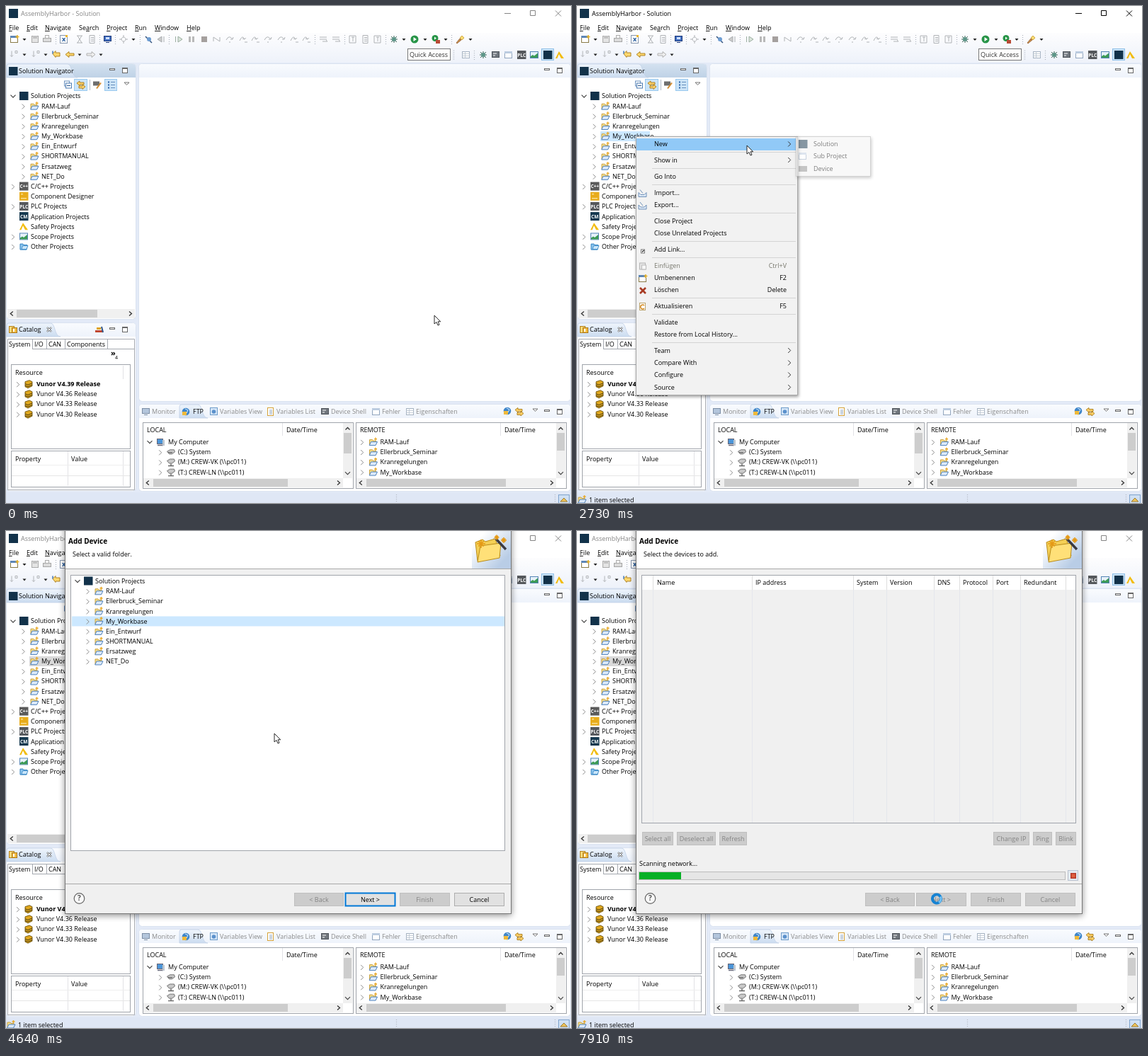
Write an HTML page that moves like this. It is 798x702 px and loops after 7990 ms.

```html
<!DOCTYPE html>
<html lang="en">
<head>
<meta charset="utf-8">
<title>Add device</title>
<style>
html, body { margin: 0; width: 100%; height: 100%; overflow: hidden; background: #fff; }
svg { display: block; }
text { font: 9px "Open Sans", "Noto Sans", sans-serif; white-space: pre; }
.b { font-weight: 700; }
.u { text-decoration: underline; }
.shadow { filter: drop-shadow(1px 2px 2px rgba(0,0,0,.4)); }
</style>
</head>
<body>
<svg id="stage" width="798" height="702" viewBox="0 0 798 702"></svg>
<script>
const LOOP = 7990;
const GREY = '#8a8a8a', EDGE = '#a0a4ab', YEL = '#eab428', NAVY = '#12324a';
const jobs = ['RAM-Lauf', 'Ellerbruck_Seminar', 'Kranregelungen', 'My_Workbase',
  'Ein_Entwurf', 'SHORTMANUAL', 'Ersatzweg', 'NET_Do'];

// Drawing helpers
const box = (x, y, w, h, fill, more = '') => `<rect x="${x}" y="${y}" width="${w}" height="${h}" fill="${fill}" ${more}/>`;
const frame = (x, y, w, h, fill, line, sw = 1) => box(x + .5, y + .5, w - 1, h - 1, fill, `stroke="${line}" stroke-width="${sw}"`);
const path = (d, line, fill = 'none', sw = 1, more = '') => `<path d="${d}" fill="${fill}" stroke="${line}" stroke-width="${sw}" ${more}/>`;
const text = (x, mid, s, fill = '#000', more = '') => `<text x="${x}" y="${mid + 3.4}" fill="${fill}" ${more}>${s}</text>`;
const group = (id, s) => `<g id="${id}">${s}</g>`;
const vline = (x, y, h, c = '#e2e2e6') => box(x, y, 1, h, c);
const right = (x, y, c = '#8c8c8c') => path(`M${x - 1.8} ${y - 3.5}l3.5 3.5l-3.5 3.5`, c);
const left = (x, y) => path(`M${x + 1.8} ${y - 3}l-3.5 3l3.5 3`, '#333', 'none', 1.3);
const down = (x, y) => path(`M${x - 3.5} ${y - 1.8}l3.5 3.5l3.5 -3.5`, '#444', 'none', 1.2);
const up = (x, y) => path(`M${x - 3} ${y + 1.5}l3 -3l3 3`, '#333', 'none', 1.3);
const drop = (x, y) => path(`M${x - 2.5} ${y - 1}h5l-2.5 3z`, 'none', '#222');
const viewMenu = (x, y) => path(`M${x} ${y}h7l-3.5 3.5z`, '#666', '#fff', .9);
const minMax = (x, y) => frame(x, y - 2, 8, 3, '#fff', '#666') +
  frame(x + 18, y - 3, 8, 8, '#fff', '#666') + box(x + 18, y - 3, 8, 2, '#666');
const badge = (s, fill) => box(0, 0, 12.5, 12, fill) +
  `<text x="6.2" y="8.6" fill="#fff" text-anchor="middle" style="font-size:6.5px;font-weight:700">${s}</text>`;

const dim = d => path(d, '#b0b3b6');
const arrow = (d, c, f) => path(d, c, f, .9);
const icons = {
  folder: path('M1 10V3h4l1 1.5h4V10z', '#c39a35', '#f7df8b', .9) +
    path('M.7 11L3 6h9L9.5 11z', '#3f77b8', '#dceafa', .9) + path('M9.5 0v4M7.5 2h4', '#e8a92a', 'none', 1.4),
  navy: box(0, 0, 12.5, 12, NAVY),
  cpp: badge('C++', '#5a5a5a'),
  plc: badge('PLC', '#55585c'),
  cm: badge('CM', '#14384f'),
  comp: box(0, 0, 12.5, 12, '#e8ac1b') + path('M2 3h3M2 9h8', '#fff3c8', 'none', 1.2),
  tri: path('M5 1L12 11H8L5 5L2.5 11H0z', 'none', '#f2bd10'),
  scope: frame(0, 1, 12, 10, '#e6f1fa', '#5585b5') + path('M1 10V8l3-2l2 1.5l5-4V10z', 'none', '#3b9a55'),
  other: path('M1 10.5V2.5h4l1 1.5h5l-1 6.5z', '#2c7fc0', '#8fc7ef') + path('M3 10l1.5-5H12l-2 5z', '#2c7fc0', '#c9e5f9', .8),
  book: path('M1 3l6-2l4 2v6l-6 3l-4-2z', '#6b5310', '#e0a81e', .9) + path('M1 6l4 1.5l6-2.5M1 8.5l4 1.5l6-2.5', '#4d3c10'),
  drive: path('M.5 5l4-2.5h6l1 3l-4 3h-4z', '#666', '#c9c9c9', .9) + path('M2 6.5h6', '#444'),
  net: path('M.5 4l4-2.5h6l1 3l-4 3h-4z', '#666', '#c9c9c9', .9) + path('M6 8v3M2 11h8', '#666', 'none', 1.4),
  pc: frame(1, 1, 9, 8, '#4b95d8', '#667') + path('M2 10.5h8', '#667', 'none', 1.5) + box(9, 3, 3, 8, '#bcc5cf'),
  screen: frame(0, 1, 11, 8, '#b4c6dc', '#7c8ea5') + path('M3 10.5h5', '#7c8ea5'),
  term: frame(0, 1, 11, 9, '#70767d', '#50565c') + path('M2 4h5M2 7h3', '#fff'),
  globe: `<circle cx="6" cy="6" r="5.3" fill="#3f86c9"/>` + box(1, 6, 6, 5, '#efb93a') + path('M5 2l4 2l-2 4', '#d9edff'),
  view: frame(0, 0, 11, 11, '#d7e7f8', '#6e9cc9') + `<circle cx="5.5" cy="6" r="2.8" fill="#5b91cc"/>`,
  list: frame(1, 0, 9, 12, '#fff', '#d6a23a') + path('M4 4h4M4 6.5h4M4 9h4', '#7e97b5'),
  win: frame(0, 1, 11, 10, '#fff', '#91a5be') + box(0, 1, 11, 3, '#bccce0'),
  table: frame(0, 1, 11, 10, '#fff', '#a6b3c2') + path('M0 4.5h11M0 7.5h11M4.5 1v10', '#b7c2cf', 'none', .8),
  fresh: frame(0, 1, 11, 10, '#fff', '#8a7b48') + box(0, 1, 11, 3, '#5d86b6') + path('M10 0v5M7.5 2.5h5', YEL, 'none', 1.6),
  save: frame(1, 1, 10, 10, '#e4e4e4', '#aaa') + box(3, 1, 6, 4, '#c2c2c2'),
  print: frame(0, 4, 12, 6, '#dcdcdc', '#a5a5a5') + frame(3, 0, 6, 5, '#fff', '#aaa'),
  x: frame(0, 0, 11, 12, '#fff', '#8797ae') + text(3, 5.5, 'x', '#1d5599', 'class="b"') + box(8, 0, 3, 3, YEL),
  mon: frame(0, 1, 11, 8, '#3f6dc0', '#203c7c') + box(3, 3, 5, 3, '#cfe0ff') + path('M3 10.5h5', '#203c7c'),
  doc: dim('M2 .5h7v11h-7zM4 3.5h4M4 6h4M4 8.5h4'),
  sand: dim('M2 1h8M2 11h8M3 1l3 5l-3 5M9 1l-3 5l3 5'),
  gear: dim('M6 3a3 3 0 1 0 .1 0M6 0v3M6 9v3M0 6h3M9 6h3'),
  skip: path('M1 2l9 9', '#33527e', 'none', 1.5) + `<circle cx="6" cy="6" r="3" fill="#6c9cd2"/>`,
  back: path('M7 2L1 6l6 4zM10 2v8', '#a9adb0', '#ccc'),
  play: path('M5 2l6 4l-6 4zM1.5 2v8', '#9aaea0', '#dbe5dc'),
  pause: box(2, 2, 3, 8, '#b9b9b9') + box(7, 2, 3, 8, '#b9b9b9'),
  stop: box(2, 2, 8, 8, '#a5a09e'),
  cut: dim('M1 9V3l9 6V3'),
  step: dim('M1 8Q5 -1 8 6l2-2M8 6L5 5M8 10h4'),
  over: dim('M1 7Q5 -1 10 6l1-3M10 6L7 6M5 10h2'),
  rows: dim('M0 3h10M0 6h10M4 9h7l-2-2'),
  para: dim('M1 1h9v10h-9zM6 3v6M4 3h4'),
  bug: path('M6 1v10M1 6h10M2 2l8 8M10 2l-8 8', '#3d6257') + `<circle cx="6" cy="6" r="3" fill="#5d9688"/>`,
  run: `<circle cx="6" cy="6" r="5.5" fill="#279447"/>` + path('M4.5 3l4.5 3l-4.5 3z', 'none', '#fff'),
  runx: `<circle cx="5" cy="4.5" r="4.5" fill="#279447"/>` + path('M4 2.5l3 2l-3 2z', 'none', '#fff') + box(6, 7, 6, 5, '#b84a35'),
  torch: path('M1 11l5-6l2 2l-6 5z', '#94623b', '#c98b45', .8) + path('M6 4l3-3l3 3l-3 3z', '#c79a28', '#f8dc76', .8),
  pin: dim('M3 1v8l-2-2M3 9l2-2M8 1h3v3h-3z'),
  ret: arrow('M1 5l4-4v2.5h6v5h-6V10z', '#a97a16', '#ffd970') + path('M1 1v4', '#3f77b8', 'none', 1.5),
  prev: arrow('M0 6l5-4v2.5h7v3h-7V10z', '#a97a16', '#ffd970'),
  next: arrow('M12 6L7 2v2.5H0v3h7V10z', '#aaa', '#eee'),
  fold: frame(0, 0, 8, 8, '#fff', '#6b92bf') + frame(2, 3, 9, 8, '#fff', '#4879b0') + path('M4 7h5', '#28558b'),
  link: arrow('M0 3.5l4-3v2h6v3H4v1.5zM12 8.5l-4-3v2H3v3h5v1.5z', '#a97a16', '#ffd26a'),
  filter: box(0, 1, 9, 6, '#6e6e6e') + path('M5 11l6-8', '#d28c2f', 'none', 2),
  tree: path('M1 2h2M1 6h2M1 10h2', '#2a61a8', 'none', 2) + path('M5 2h6M5 6h6M5 10h6', '#6b92bf', 'none', 1.2),
  shelf: box(0, 7, 11, 3, '#c2472f') + box(2, 3, 6, 3, '#e0a422') + path('M9 2l2 8', '#35588a', 'none', 2),
  cat: frame(0, 1, 8, 10, '#ffdc7a', '#b4801a') + frame(4, 3, 8, 8, '#f5bd41', '#a9771b') + box(6, 5, 2, 4, '#fff'),
  imp: path('M0 5v6h11V5l-3 3H3zM2 1l4 5', '#6287b3', '#dce8f5', .9),
  mini: frame(3, 5, 6, 6, '#fff', '#777') + path('M5 9l2.5-2.5', '#222', 'none', 1.3),
  paste: frame(1, 1, 9, 10, '#e5e5e5', '#b5b5b5') + frame(4, 4, 7, 7, '#f7f7f7', '#bbb'),
  del: path('M2 2l8 8M10 2l-8 8', '#a83a22', 'none', 2.6),
  redo: frame(1, 0, 9, 11, '#fff', '#bba36b') + path('M8 4a3 3 0 1 0 0 4', '#d48a20', 'none', 1.5),
  dev: box(0, 2, 12, 8, '#8d8d8d')
};
const icon = (key, x, mid) => `<g transform="translate(${x} ${mid - 6})">${icons[key]}</g>`;
const strip = (list, y) => list.split(' ').map(s => {
  const [key, x] = s.split(':');
  if (key === 'dd') return drop(+x, y);
  if (key === 'sep') return path(`M${x}.5 ${y - 6}v13`, '#aeb4bd', 'none', 1.2, 'stroke-dasharray="1 2"');
  return icon(key, +x, y);
}).join('');

const projectRows = (x, y, n = 8, pitch = 14.17) => jobs.slice(0, n).map((s, i) => {
  const m = y + i * pitch;
  return right(x - 25.5, m + .8) + icon('folder', x - 16, m) + text(x, m, s);
}).join('');
const hscroll = (x, y, w, a, b) => box(x, y, w, 13, '#f0f0f0') + box(a, y + 1, b - a, 11, '#cdcdcd') +
  left(x + 6, y + 6.5) + path(`M${x + w - 8} ${y + 3.5}l3.5 3l-3.5 3`, '#333', 'none', 1.3);
const vscroll = (x, end) => box(x, 589, 13, 78, '#f0f0f0') + box(x + 1, 603, 11, end - 603, '#cdcdcd') +
  up(x + 6.5, 597) + down(x + 6.5, 660);
const panel = (x, y, w, h, fill = 'idle') => `<rect x="${x + .5}" y="${y + .5}" width="${w - 1}" height="${h - 1}" rx="5" fill="#fff" stroke="#dbe3f0"/>` +
  path(`M${x + 1} ${y + 20}V${y + 5}q0 -4 4 -4H${x + w - 5}q4 0 4 4V${y + 20}z`, 'none', `url(#${fill})`);
const tab = (x, y, w) => path(`M${x} ${y + 20}V${y + 4}q0 -3 3 -3H${x + w - 12}c7 0 5 19 14 19z`, '#c0d0e6', 'url(#sel)', .8);

function drawWindow() {
  let s = box(0, 0, 798, 702, '#e3eaf7') + box(0, 0, 798, 38, '#fff') + box(0, 38, 798, 42, 'url(#bar)');
  s += box(4, 4, 13, 13, NAVY);
  s += group('caption', text(21, 10.5, 'AssemblyHarbor - Solution', 'currentColor') +
    path('M704 10.5h9M740.5 6.5h7v7h-7zM776 6.5l8 8M784 6.5l-8 8', 'currentColor'));
  s += [[4, 'File', 0], [29, 'Edit', 0], [55, 'Navigate', 0], [103, 'Search', 2], [142, 'Project', 0], [182, 'Run', 0],
    [210, 'Window', 0], [255, 'Help', 0]].map(([x, w, k]) =>
    text(x, 30.5, `${w.slice(0, k)}<tspan class="u">${w[k]}</tspan>${w.slice(k + 1)}`)).join('');
  s += strip('fresh:6 dd:26 save:35 print:52 sep:70 x:76 sand:98 doc:116 sep:132 mon:138 sep:154 gear:160 dd:180 sep:189 skip:196 back:213 sep:230 play:238 pause:256 stop:274 cut:292 over:310 step:329 step:346 over:364 over:383 step:401 step:418 sep:436 rows:443 rows:461 sep:478 para:484 doc:502 para:519 sep:536 bug:542 dd:562 run:571 dd:592 runx:601 dd:621 sep:629 torch:635 dd:656', 47);
  s += strip('pin:5 dd:26 pin:36 dd:56 ret:65 prev:84 dd:104 next:114 dd:134 sep:632', 68.5);
  s += frame(567, 60, 61, 17, '#fff', '#777') + text(570, 68.5, 'Quick Access', '#333');
  s += frame(756, 60, 18, 17, '#cce4f7', '#8fc0e8');
  s += strip('table:644 sep:661 bug:668 term:686 win:704 plc:722 scope:740 navy:759 tri:776', 69);

  // Navigator
  s += panel(0, 81, 184, 362, 'focus') + tab(1, 81, 98) + icon('navy', 4, 92) + text(18, 92, 'Solution Navigator') + minMax(146, 90);
  s += frame(96, 103, 19, 17, '#cce4f7', '#99c9ef') + frame(139, 103, 18, 17, '#cce4f7', '#99c9ef');
  s += strip('fold:82 link:100 filter:123 tree:143', 111.5) + vline(118, 104, 15, '#b5bcc6') + viewMenu(167, 108);
  const pick = (id, c) => group(id, box(33, 177, 70, 14, c));
  s += pick('hover', '#e5f3ff') + pick('picked', '#cce8ff') + pick('dimmed', '#d9d9d9');
  s += down(10, 127.5) + icon('navy', 19, 127) + text(35, 127, 'Solution Projects') + projectRows(50, 141.2);
  [['cpp', 'C/C++', 1], ['comp', 'Component Designer', 0], ['plc', 'PLC', 1], ['cm', 'Application', 0], ['tri', 'Safety', 0],
    ['scope', 'Scope', 1], ['other', 'Other', 1]].forEach(([key, w, open], i) => {
    const m = 254.6 + i * 14.17;
    s += (open ? right(10, m + .8) : '') + icon(key, 19, m) + text(35, m, key === 'comp' ? w : w + ' Projects');
  });
  s += hscroll(2, 428, 180, 15, 129);

  // Catalog
  s += panel(0, 447, 184, 239) + tab(1, 447, 74) + icon('cat', 4, 457) + text(18, 457, 'Catalog');
  s += path('M58 454l6 6M64 454l-6 6', '#666', 'none', 2.4) + path('M58 454l6 6M64 454l-6 6', '#fff', 'none', 1);
  s += icon('shelf', 126, 457) + minMax(146, 456) + path('M2.5 484V470.5H181.5V683.5H2.5V484M37.5 471v13M57.5 471v13M83.5 471v13M143.5 471v13M37 484.5H181', '#a5a9b0');
  s += text(4, 477.5, 'System') + text(40, 477.5, 'I/O') + text(60, 477.5, 'CAN') + text(86, 477.5, 'Components');
  s += text(148, 491, '»', '#000', 'class="b" style="font-size:11px"') + text(154, 495.5, '4', '#000', 'style="font-size:7px"');
  s += frame(7, 506, 169, 120, '#fff', EDGE) + text(13, 517.5, 'Resource') + vline(165, 508, 19);
  [39, 36, 33, 30].forEach((v, i) => {
    const m = 533.7 + i * 14.17;
    s += right(17, m + 1) + icon('book', 26, m) + text(43, m, `Vunor V4.${v} Release`, '#000', i ? '' : 'class="b"');
  });
  s += frame(7, 628, 169, 52, '#fff', EDGE) + text(13, 639.5, 'Property') + text(92, 639.5, 'Value');
  s += vline(87, 629, 49) + vline(165, 629, 49) + box(8, 648, 167, 1, '#eee') + box(8, 663, 167, 1, '#e6e6e6');

  // Editor and file transfer
  s += panel(187, 81, 611, 478) + minMax(760, 90) + panel(187, 562, 611, 124) + tab(245, 562, 38);
  [['screen', 192, 206, 'Monitor'], ['globe', 248, 264, 'FTP'], ['view', 288, 302, 'Variables View'], ['list', 368, 382, 'Variables List'],
    ['term', 445, 459, 'Device Shell'], ['win', 517, 531, 'Fehler'], ['table', 565, 579, 'Eigenschaften']].forEach(([k, x, tx, w]) => {
    s += icon(k, x, 573) + text(tx, 573, w, w === 'FTP' ? '#000' : GREY);
  });
  s += icon('globe', 702, 572) + icon('link', 719, 573) + viewMenu(744, 569) + minMax(760, 572);
  [[193, 'LOCAL', 632, 398], [494, 'REMOTE', 628, 706]].forEach(([x, w, end, b]) => {
    s += frame(x, 588, 298, 94, '#fff', EDGE) + text(x + 6, 599, w) + text(x + (x < 200 ? 203 : 210), 599, 'Date/Time') +
      vline(x + (x < 200 ? 197 : 204), 589, 18) + vscroll(x + 283, end) + hscroll(x + 1, 667, 282, x + 15, b);
  });
  s += down(203, 616) + icon('pc', 212, 616) + text(229, 615.5, 'My Computer');
  ['(C:) System', '(M:) CREW-VK (\\\\pc011)', '(T:) CREW-LN (\\\\pc011)'].forEach((w, i) => {
    const m = 629.8 + i * 14.17;
    s += right(218, m + 1) + icon(i ? 'net' : 'drive', 227, m + .5) + text(243, m, w);
  });
  s += projectRows(528.5, 615.6, 4);
  s += box(0, 687, 798, 15, '#dfe7f5') + strip('sep:551 sep:775', 696) + frame(780, 690, 16, 14, '#cfe0f3', '#7fa4cd') +
    path('M783 700l5-5l5 5z', '#9a7a31', '#f1c559');
  return s + group('status', icon('folder', 1, 697) + text(17, 697.5, '1 item selected'));
}

function drawMenu() {
  let s = box(83.5, 184.5, 228, 365, '#f2f2f2', 'stroke="#a9a9a9" class="shadow"');
  s += group('newBar', box(84, 187, 225, 17, '#91c9f7'));
  [206, 229, 252, 292, 332, 355, 412, 435, 475].forEach(y => s += box(106, y, 203, 1, '#d4d4d4'));
  const rows = [[195, 'New', '>'], [217.5, 'Show in', '>'], [240.5, 'Go Into'], [263.5, 'Import...', '', 'imp'], [281, 'Export...', '', 'imp'],
    [303.5, 'Close Project'], [321, 'Close Unrelated Projects'], [343.5, 'Add Link...', '', 'mini'], [366.5, 'Einfügen', 'Ctrl+V', 'paste'],
    [384, 'Umbenennen', 'F2', 'fresh'], [401, 'Löschen', 'Delete', 'del'], [424, 'Aktualisieren', 'F5', 'redo'], [446.5, 'Validate'],
    [464, 'Restore from Local History...'], [486.5, 'Team', '>'], [504, 'Compare With', '>'], [521, 'Configure', '>'], [538.5, 'Source', '>']];
  for (const [m, w, key, ic] of rows) {
    const c = ic === 'paste' ? '#77776c' : '#000';
    s += text(109, m, w, c) + (ic ? icon(ic, 87, m + 1) : '');
    if (key) s += key === '>' ? right(300, m, '#333') : text(296, m, key, c, 'text-anchor="end"');
  }
  return s;
}

const deviceBar = box(310, 221, 101, 17, '#91c9f7');
const deviceItem = icon('dev', 313, 230) + text(334, 230, 'Device');
const drawSub = () => box(309.5, 184.5, 105, 56, '#f2f2f2', 'stroke="#a9a9a9" class="shadow"') +
  group('bar0', box(310, 187, 101, 17, '#91c9f7')) + group('bar1', box(310, 204, 101, 17, '#91c9f7')) + group('bar2', deviceBar) +
  icon('navy', 313, 195) + text(334, 195, 'Solution') + icon('win', 313, 212) + text(334, 212, 'Sub Project') + deviceItem;

const looks = { off: ['#cccccc', '#bfbfbf', '#838383', 1], on: ['#e1e1e1', '#adadad', '#000', 1],
  main: ['#e1e1e1', '#0078d7', '#000', 2], hot: ['#e5f1fb', '#0078d7', '#000', 1] };
function button(x, y, w, label, look) {
  const [fill, line, ink, sw] = looks[look];
  return frame(x, y, w, 19, fill, line, sw) + text(x + w / 2, y + 9.3, label, ink, 'text-anchor="middle"');
}

function drawDialog() {
  let s = box(83.5, -12, 630, 552.5, '#f0f0f0', 'stroke="#777" style="filter:drop-shadow(0 2px 5px rgba(0,0,0,.45))"');
  s += box(84, -11, 629, 64, '#fff') + box(658, 0, 55, 53, 'url(#corner)') + box(84, 53, 629, 1, '#a8a8a8') + box(84, 498, 629, 1, '#a8a8a8');
  s += text(88, 14.5, 'Add Device', '#000', 'class="b" style="font-size:10px"');
  s += path('M666 42l-3-26l10-4l4 3l14-4l2 6l5 18z', '#b98b18', '#f4cf55') + path('M666 44l4-23l29-4l-2 21z', '#b98b18', '#ffe078');
  s += path('M690 9l16 17', '#3a3a42', 'none', 3.4) + path('M688 7l4 4', '#f4f4f4', 'none', 3);
  const star = (x, y, r) => path(`M${x - r} ${y}h${2 * r}M${x} ${y - r}v${2 * r}M${x - r * .6} ${y - r * .6}l${r * 1.2} ${r * 1.2}M${x + r * .6} ${y - r * .6}l${-r * 1.2} ${r * 1.2}`, '#e59a17', 'none', 1.6);
  s += star(671, 18, 6) + star(693, 9, 3.5) + star(703, 13, 4);
  s += `<circle cx="103.5" cy="519" r="7.3" fill="#f8f8f8" stroke="#666" stroke-width="1.2"/>` + text(103.5, 519, '?', '#555', 'text-anchor="middle" class="b" style="font-size:10px"');
  s += button(407, 511, 70, '&lt; Back', 'off') + button(556, 511, 71, 'Finish', 'off');
  for (const k of ['off', 'main', 'hot']) s += group('next-' + k, button(479, 511, 71, 'Next &gt;', k));
  s += group('cancel-on', button(633, 511, 71, 'Cancel', 'on')) + group('cancel-off', button(633, 511, 71, 'Cancel', 'off'));

  let one = text(94, 33, 'Select a valid folder.') + frame(91, 62, 614, 390, '#fff', EDGE);
  one += group('rowOn', box(93, 120.5, 611, 14, '#cce8ff')) + group('rowOff', box(93, 120.5, 611, 14, '#d9d9d9'));
  one += down(101, 71) + icon('navy', 110, 70.5) + text(126, 70.5, 'Solution Projects') + projectRows(141, 84.8);

  let two = text(94, 33, 'Select the devices to add.') + frame(91, 62, 614, 351, '#fff', EDGE) + group('veil', box(92, 83, 612, 329, '#f0f0f0'));
  [107, 247, 390, 437, 504, 540, 587, 626, 690].forEach(x => two += vline(x, 63, 20, '#dedede') + vline(x, 83, 329, '#e4e6ec'));
  [[113, 'Name'], [252, 'IP address'], [395, 'System'], [442, 'Version'], [509, 'DNS'], [545, 'Protocol'], [592, 'Port'], [631, 'Redundant']]
    .forEach(([x, w]) => two += text(x, 73, w));
  [[92, 44, 'Select all'], [141, 55, 'Deselect all'], [201, 39, 'Refresh'], [588, 51, 'Change IP'], [644, 27, 'Ping'], [676, 29, 'Blink']]
    .forEach(([x, w, label]) => two += button(x, 425, w, label, 'off'));
  two += group('scan', text(88, 470, 'Scanning network...') + frame(87, 481, 603, 12, '#e6e6e6', '#bcbcbc') +
    box(88, 482, 0, 10, '#06b025', 'id="progress"') + frame(693, 479, 15, 15, '#e4e8ee', '#b9c4d2') + box(697, 483, 8, 8, '#b5392a') + box(698.5, 484.5, 5, 5, '#e0603f'));
  return s + group('page1', one) + group('page2', two);
}

const gradient = (id, a, b, dir = 'x2="0" y2="1"') => `<linearGradient id="${id}" ${dir}><stop stop-color="${a}"/><stop offset="1" stop-color="${b}"/></linearGradient>`;
const stage = document.getElementById('stage');
stage.innerHTML = `<defs>${gradient('idle', '#f9fbfe', '#eef3fb')}${gradient('focus', '#d3e1f0', '#bfd2e6')}${gradient('sel', '#eff5fc', '#cbdcf0')}` +
  `${gradient('bar', '#fdfdfe', '#eef2fa')}${gradient('corner', '#ffffff', '#b9cde6', 'x1=".35" y1="0" x2="1" y2=".6"')}</defs>` +
  drawWindow() + group('menu', drawMenu()) + group('sub', drawSub()) + group('dialog', drawDialog()) +
  group('ghost', deviceBar + deviceItem) + group('click', '<circle r="9" fill="#f0e628" opacity=".8"/>') +
  group('pointer', path('M0 0V12L3 9.5L5 14L7 13.2L5.1 8.8H8.7z', '#111', '#fff', .9)) +
  group('busy', '<circle r="6" fill="none" stroke="#1683d3" stroke-width="4"/><path d="M0 -6A6 6 0 0 1 6 0" fill="none" stroke="#74c2f3" stroke-width="3"/>');

const el = {};
stage.querySelectorAll('[id]').forEach(e => el[e.id] = e);
function show(id, value) {
  const v = +value;
  el[id].style.display = v > 0 ? '' : 'none';
  el[id].style.opacity = v;
}
// Share done of a change that ticks n times from a to b
const ticks = (t, a, b, n) => t < a ? 0 : t >= b ? 1 : (Math.floor((t - a) / (b - a) * (n - 1)) + 1) / n;
const fade = (t, start, n) => t < start ? 0 : Math.min(1, (Math.floor((t - start) / 80) + 1) / n);
const within = (t, a, b) => t >= a && t < b;
const smooth = p => p * p * (3 - 2 * p), linear = p => p;

// start, end, ticks, x, y, easing
const moves = [[90, 800, 10, 111, 187, smooth], [900, 1110, 4, 82, 184, smooth], [1920, 2570, 9, 192, 191, smooth],
  [2650, 2730, 2, 240, 197, linear], [2810, 3200, 6, 345, 193, smooth], [3360, 3650, 5, 357, 229, smooth],
  [4270, 4640, 5, 379, 286, smooth], [4720, 5490, 11, 508, 520, smooth]];
function pointerAt(t) {
  let x = 605, y = 437;
  for (const [a, b, n, tx, ty, ease] of moves) {
    const p = ease(ticks(t, a, b, n));
    x += (tx - x) * p;
    y += (ty - y) * p;
  }
  return [x, y];
}

function draw(t) {
  const [x, y] = pointerAt(t);
  const active = within(t, 1430, 3880), pageTwo = t >= 6950, scanning = t >= 7200;
  el.caption.style.color = active ? '#000' : '#858585';
  show('hover', within(t, 1030, 1430));
  show('picked', active);
  show('dimmed', t >= 3880);
  show('status', t >= 1430);
  show('menu', t < 3880 ? fade(t, 1840, 3) : 0);
  show('newBar', t >= 2000 && y > 187);
  show('sub', t < 3880 ? fade(t, 2650, 4) : 0);
  const item = x < 310 ? -1 : y < 204 ? 0 : y < 221 ? 1 : 2;
  for (let i = 0; i < 3; i++) show('bar' + i, item === i);
  show('ghost', within(t, 3880, 4280) ? 1.12 - fade(t, 3880, 5) * 1.2 : 0);

  const grow = fade(t, 4030, 5), k = .9375 + .0625 * grow;
  show('dialog', grow);
  el.dialog.setAttribute('transform', `translate(398 270) scale(${k}) translate(-398 -270)`);
  const ready = grow === 1 && !pageTwo, hot = t >= 5490;
  show('next-off', !ready);
  show('next-main', ready && !hot);
  show('next-hot', ready && hot);
  show('cancel-on', !scanning);
  show('cancel-off', scanning);
  show('page1', !pageTwo);
  show('rowOn', t < 6560);
  show('rowOff', t >= 6560);
  show('page2', pageTwo);
  show('veil', scanning);
  show('scan', scanning);
  el.progress.setAttribute('width', 59 * ticks(t, 7200, 7910, 10));

  show('click', within(t, 1430, 1610) || within(t, 3880, 4030) || within(t, 6560, 6800));
  el.click.setAttribute('transform', `translate(${x + 2} ${y + 1})`);
  show('pointer', !pageTwo);
  el.pointer.setAttribute('transform', `translate(${x} ${y})`);
  show('busy', pageTwo);
  el.busy.setAttribute('transform', `translate(508 519.5) rotate(${Math.floor(t / 80) * 30})`);
}

const begin = performance.now();
function tick() {
  draw((performance.now() - begin) % LOOP);
  requestAnimationFrame(tick);
}
tick();
</script>
</body>
</html>
```
